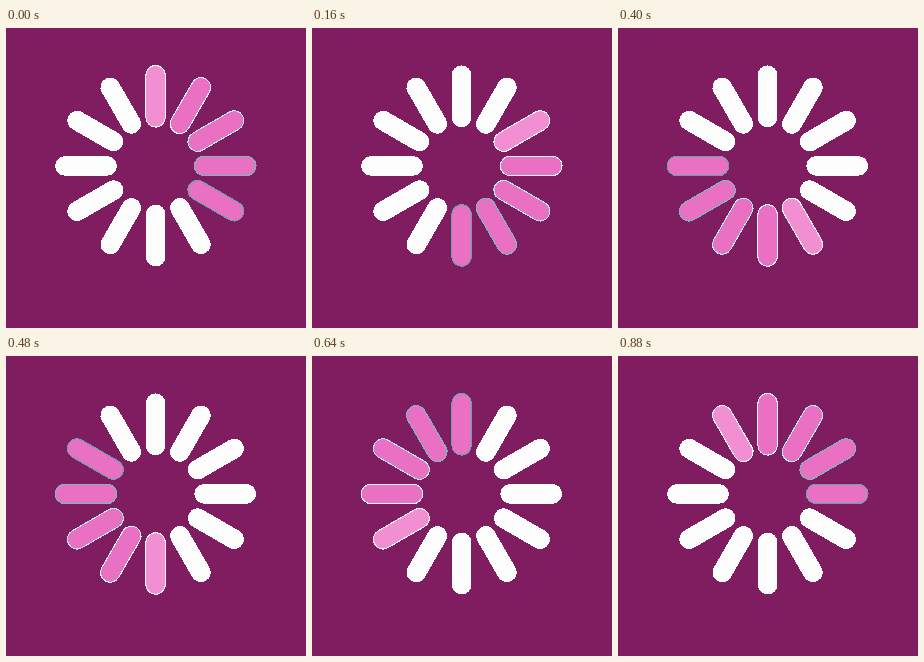
Animation, 300 px wide and 300 px high, one loop 960 ms. Source, as an HTML page:

```html
<!DOCTYPE html>
<html lang="en">
<head>
<meta charset="utf-8">
<title>Spinner</title>
<style>
  html, body { margin: 0; width: 100%; height: 100%; overflow: hidden; background: #801d60; }
  svg { display: block; width: 100vw; height: 100vh; }
</style>
</head>
<body>
<svg id="stage" viewBox="0 0 300 300" shape-rendering="crispEdges">
  <rect width="300" height="300" fill="#801d60"/>
  <g id="bars" transform="translate(149.6 137.9)" stroke-linecap="round"></g>
</svg>
<script>
const COUNT = 12;
const STEP = 80;
const WHITE = '#fdfdfd';

// Lit bars from the pale tail to the leading head.
const TRAIL = [
  { fill: '#f28fd2', edge: '#fafdfd' },
  { fill: '#ea70c4', edge: '#e2fafa' },
  { fill: '#ea70c4', edge: '#a4f0e6' },
  { fill: '#ea70c4', edge: '#74bcbc' },
  { fill: '#ea70c4', edge: '#64a4a8' }
];

const group = document.getElementById('bars');

function addLine(angle) {
  const line = document.createElementNS('http://www.w3.org/2000/svg', 'line');
  line.setAttribute('y1', -48.5);
  line.setAttribute('y2', -90.7);
  line.setAttribute('transform', `rotate(${angle})`);
  group.appendChild(line);
  return line;
}

const bars = Array.from({ length: COUNT }, (_, i) => {
  const angle = i * 360 / COUNT;
  return { edge: addLine(angle), core: addLine(angle) };
});

function paint(line, color, width) {
  line.setAttribute('stroke', color);
  line.setAttribute('stroke-width', width);
}

function draw(time) {
  const tail = Math.floor(time / STEP) % COUNT;
  bars.forEach((bar, i) => {
    const lit = TRAIL[(i - tail + COUNT) % COUNT];
    paint(bar.edge, lit ? lit.edge : WHITE, lit ? 20.6 : 19.6);
    paint(bar.core, lit ? lit.fill : WHITE, 18.4);
  });
}

const start = performance.now();
function tick() {
  draw(performance.now() - start);
  requestAnimationFrame(tick);
}
draw(0);
requestAnimationFrame(tick);
</script>
</body>
</html>
```
